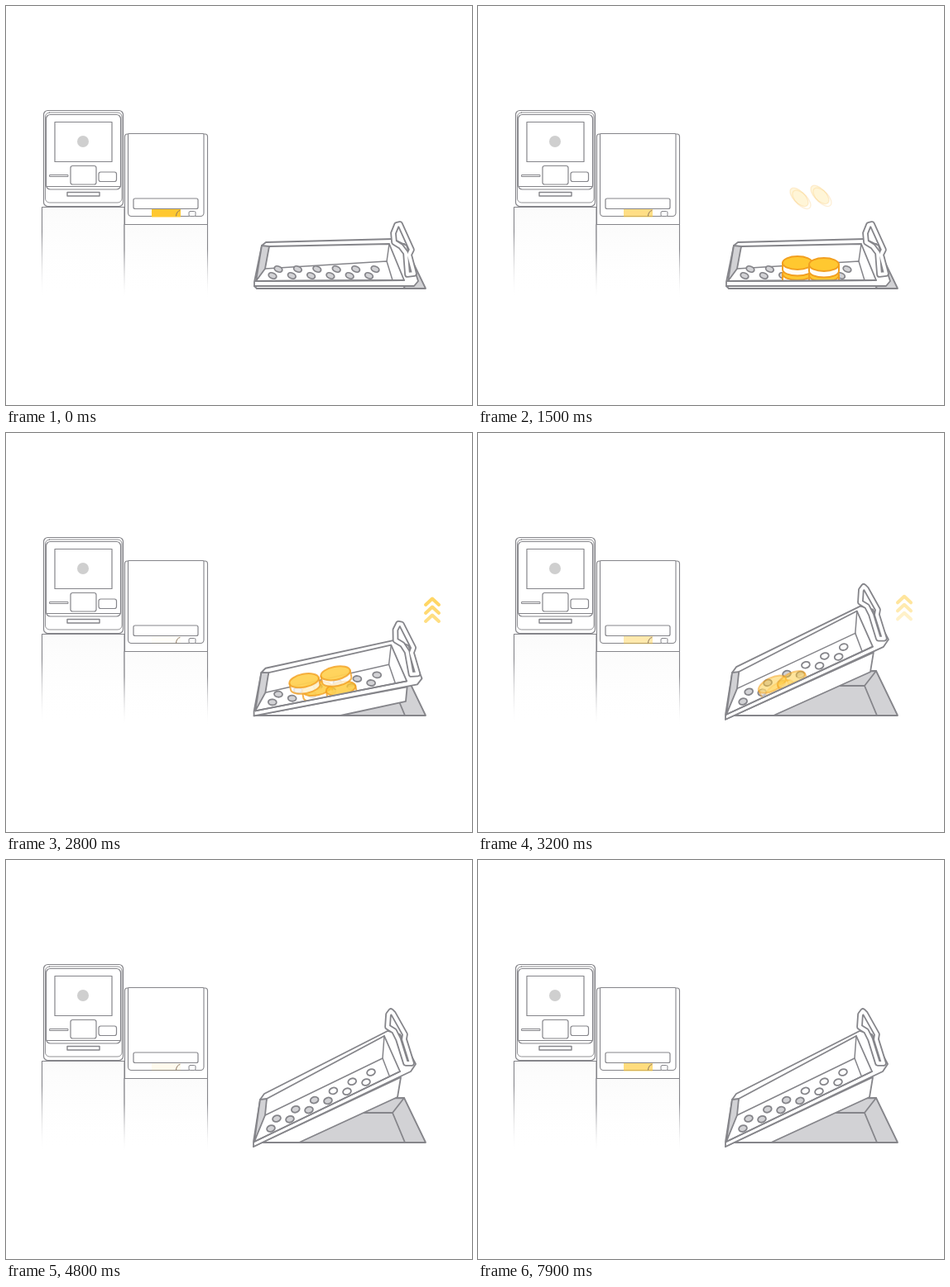
An HTML page with a canvas that plays this animation: 563x483 px, repeating every 8000 ms.

```html
<!DOCTYPE html>
<html lang="en">
<head>
<meta charset="utf-8">
<title>Coin tray</title>
<style>
  html, body { margin: 0; width: 100%; height: 100%; overflow: hidden; background: #fff; }
  canvas { display: block; width: 563px; height: 483px; }
</style>
</head>
<body>
<canvas id="stage"></canvas>
<script>
const LOOP = 8000, STEP = 100;
const LINE = '#85858a', SHADE = '#d2d2d5', YELLOW = '#ffc830', ORANGE = '#f29f1f';
const canvas = document.getElementById('stage');
const ctx = canvas.getContext('2d');
const ratio = window.devicePixelRatio || 1;
canvas.width = 563 * ratio;
canvas.height = 483 * ratio;

const clamp = v => Math.max(0, Math.min(1, v));
const mix = (a, b, k) => a + (b - a) * k;
const progress = (t, from, to) => clamp((t - from) / (to - from));
const smooth = k => k * k * (3 - 2 * k);

function paint(fill, stroke, width) {
  if (fill) { ctx.fillStyle = fill; ctx.fill(); }
  if (stroke) { ctx.strokeStyle = stroke; ctx.lineWidth = width; ctx.stroke(); }
}

function trace(points, closed = true) {
  ctx.beginPath();
  points.forEach(([x, y]) => ctx.lineTo(x, y));
  if (closed) ctx.closePath();
}

function shape(points, fill, stroke = LINE, width = 1.8, closed = true) {
  trace(points, closed);
  paint(fill, stroke, width);
}

function box(x1, y1, x2, y2, r = 0, fill = '#fff', width = 1.2) {
  ctx.beginPath();
  ctx.roundRect(x1, y1, x2 - x1, y2 - y1, r);
  paint(fill, LINE, width);
}

function ellipse(x, y, rx, ry, angle, fill, stroke, width) {
  ctx.beginPath();
  ctx.ellipse(x, y, rx, ry, angle, 0, 2 * Math.PI);
  paint(fill, stroke, width);
}

function cabinet(left, right, top) {
  const fade = (color, from) => {
    const g = ctx.createLinearGradient(0, from, 0, 355);
    g.addColorStop(0, color);
    g.addColorStop(1, 'rgba(255,255,255,0)');
    return g;
  };
  ctx.fillStyle = fade('#fbfbfb', top);
  ctx.fillRect(left, top, right - left, 355 - top);
  const line = fade(LINE, top + 30);
  shape([[left, 355], [left, top], [right, top], [right, 355]], null, line, 1.1, false);
}

function drawMachines(glow) {
  cabinet(43.5, 143, 243.5);
  cabinet(143, 243.5, 264.5);

  box(45.5, 126.5, 141.5, 242.5, 5);
  box(47.5, 129, 140, 238, 5, '#fff', 0.9);
  box(48.5, 131.5, 138.5, 222, 5);
  shape([[49, 218.5], [138, 218.5]], null, LINE, 1, false);
  box(59, 140.5, 128, 188.5);
  ellipse(93, 164, 7, 7, 0, '#cfcfcf');
  box(53, 204.5, 75, 206.5, 0, '#fff', 1);
  box(78, 193.5, 109, 216, 2.5);
  box(112, 201, 133.5, 212.5, 2.5);
  box(74, 225.5, 113, 230, 0, '#fff', 1.4);

  box(143.5, 155, 243.5, 264.5, [3, 3, 0, 0], '#fff', 1.1);
  box(147.5, 154.5, 239, 254.5, [1, 1, 4, 4], '#fff', 1.1);
  box(154, 233, 232, 245.5, 2);
  box(221, 248.5, 229, 254.5, 1.5, '#fff', 1);
  ctx.globalAlpha = glow;
  ctx.fillStyle = YELLOW;
  ctx.fillRect(176, 246, 35, 9.5);
  ctx.globalAlpha = 1;
  ctx.beginPath();
  ctx.moveTo(205.5, 254);
  ctx.quadraticCurveTo(206, 248.5, 210, 247.5);
  paint(null, '#8a745f', 1);
}

function drawCoin(x, y, angle, alpha) {
  if (alpha <= 0) return;
  ctx.save();
  ctx.globalAlpha = alpha;
  ctx.translate(x, y);
  ctx.rotate(angle);
  ctx.beginPath();
  ctx.moveTo(-18, 0);
  ctx.lineTo(-18, 8);
  ctx.ellipse(0, 8, 18, 7.5, 0, Math.PI, 0, true);
  ctx.lineTo(18, 0);
  paint('#fffdf6', ORANGE, 2);
  ellipse(0, 0, 18, 8, 0, YELLOW, ORANGE, 2);
  ctx.restore();
}

function drawFallingPair(t, start, top) {
  const u = progress(t, start, start + 600);
  if (u <= 0 || u >= 1) return;
  ctx.globalAlpha = Math.min(u, 0.9, (1 - u) * 4);
  for (const [x, dy] of [[389, 2], [414, -1]]) {
    const y = mix(top, 312, u * u) + dy;
    ellipse(x + 2, y + 2, 14, 7, 0.8, '#fff6dd', ORANGE, 1.3);
    ellipse(x - 1, y - 1, 14, 7, 0.8, YELLOW, ORANGE, 1.3);
  }
  ctx.globalAlpha = 1;
}

function drawCoins(t, lift) {
  const stack = progress(t, 600, 900) * (1 - progress(t, 2000, 2300));
  for (const [x, y] of [[386, 311], [418, 313]]) {
    drawCoin(x, y + 13, 0, stack);
    drawCoin(x, y, 0, stack);
  }
  const slide = progress(t, 2400, 3700) ** 1.4;
  const pile = progress(t, 2000, 2300) * (1 - progress(t, 2500, 3850));
  for (const [x, y] of [[382, 309], [418, 309], [363, 297], [410, 286]])
    drawCoin(mix(x, 348, slide), mix(y, 311, slide), -0.47 * lift, pile);
  drawFallingPair(t, 200, 241);
  drawFallingPair(t, 1400, 228);
}

function drawTray(t) {
  const lift = smooth(progress(t, 2400, 3300));
  // Each point blends from its resting place to its raised place, bowing outwards.
  const at = ([x1, y1, x2, y2]) => [
    mix(x1, x2, lift) + 24 * lift * (1 - lift) * (x1 - 300) / 200,
    mix(y1, y2, lift)
  ];
  const pose = (...points) => points.map(at);

  // Fixed well under the tray
  shape([[303, 342], [313, 290], [481, 288], [507, 342]], SHADE);
  shape([[431, 306], [467, 306], [482, 342]], null, LINE, 1.8, false);
  shape([[467, 306], [481, 288]], null, LINE, 1.8, false);

  const body = pose([300, 339, 299, 347], [481, 339, 477, 263], [481, 352, 473, 287])
    .map(([x, y], i) => [x, i ? Math.min(y, 342) : y]);
  shape([...body, [mix(440, 354, lift), 342], [303, 342]], '#fff');

  const [a, b, c, d] = pose([318, 291, 315, 289], [463, 288, 457, 213],
    [481, 332, 476, 256], [302, 333, 300, 341]);
  const [ledge, floorLeft, floorBack, floorFront] = pose([309, 290, 307, 290],
    [313, 318, 313, 309], [460, 309, 455, 240], [467, 332, 463, 261]);
  const rim = pose([314, 286, 312, 283], [468, 282, 461, 207], [484, 290, 476, 211],
    [498, 333, 495, 247], [493, 339, 489, 256], [300, 339, 299, 347], [300, 334, 299, 341]);
  shape([...rim, ledge], '#fff');
  shape([a, b, c, d], '#fff');
  shape([floorLeft, floorBack, floorFront], null, LINE, 1.5, false);
  shape([b, floorBack], null, LINE, 1.5, false);
  shape([ledge, a, floorLeft, d], SHADE);

  for (let i = 0; i < 6; i++) {
    const rows = pose([329 + 23.4 * i, 318.5, 327 + 22.8 * i, 313 - 11.2 * i],
      [322 + 23.3 * i, 326.5, 320 + 23 * i, 325 - 11.2 * i]);
    rows.forEach(([x, y], row) => {
      const dark = lift < 0.7 || i < 3 + row;
      ellipse(x, y, 5, mix(3.3, 3.8, lift), mix(0.4, -0.3, lift), dark ? SHADE : '#fff', LINE, 1.8);
    });
  }

  ctx.save();
  trace([d, c, [540, 0], [250, 0]]);
  ctx.clip();
  drawCoins(t, lift);
  ctx.restore();
  shape([d, c], null, LINE, 1.8, false);

  const handle = pose([477, 291, 469, 207], [469, 286, 461, 202], [468, 275, 462, 187],
    [472, 265, 465, 183], [476, 264, 468, 186], [490, 295, 482, 211], [487, 301, 481, 217],
    [493, 324, 490, 246], [485, 325, 483, 246], [483, 299, 474, 217]);
  shape(handle, null, LINE, 7.6);
  shape(handle, null, '#fff', 4);
}

function drawArrows(t) {
  for (const start of [2050, 5250]) {
    const u = t - start;
    for (let i = 0; i < 3; i++) {
      const alpha = Math.min((u - 150 * i) / 400, (1450 + 210 * i - u) / (1160 + 170 * i));
      if (alpha <= 0) continue;
      const y = 205.5 - u / 150 + 10 * (2 - i);
      ctx.globalAlpha = Math.min(alpha, 0.9);
      shape([[507, y + 7.5], [515, y], [523, y + 7.5]], null, YELLOW, 4, false);
    }
  }
  ctx.globalAlpha = 1;
}

function render(t) {
  ctx.setTransform(ratio, 0, 0, ratio, 0, 0);
  ctx.fillStyle = '#fff';
  ctx.fillRect(0, 0, 563, 483);
  ctx.lineJoin = ctx.lineCap = 'round';
  const phase = t / 1887.5 % 1;
  drawMachines(Math.abs(1 - 2 * phase));
  drawTray(t);
  drawArrows(t);
}

function tick() {
  render(Math.floor(performance.now() % LOOP / STEP) * STEP);
  requestAnimationFrame(tick);
}
tick();
</script>
</body>
</html>
```
